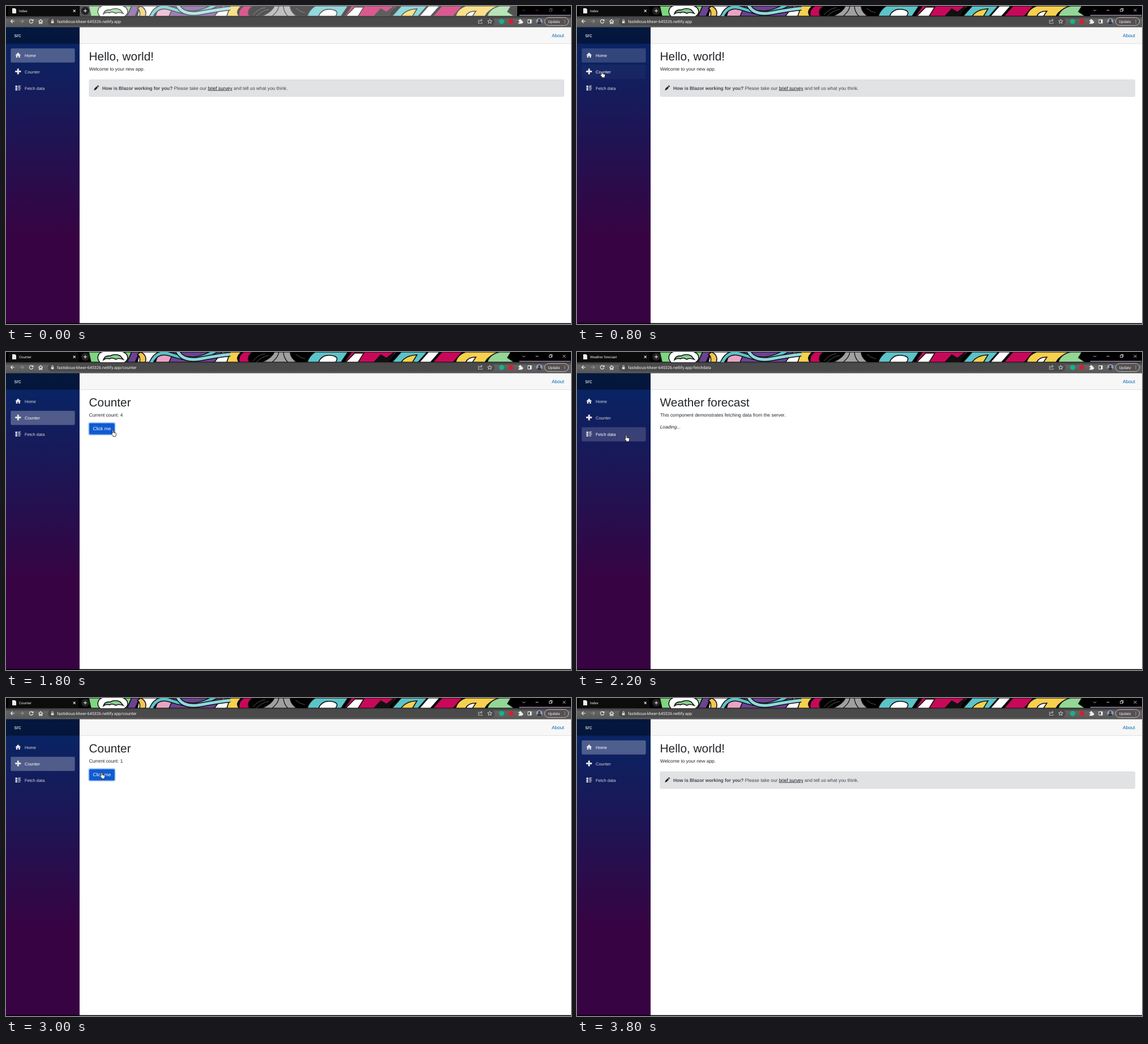
Recreate the animation shown at these times as an HTML page. Size 998 by 561 pixels, loop 4100 ms.

```html
<!DOCTYPE html>
<html lang="en">
<head>
<meta charset="utf-8">
<title>Web app demo</title>
<style>
  html, body { margin: 0; width: 100%; height: 100%; overflow: hidden; background: #fff }
  svg { display: block; font: 8.32px "Liberation Sans", Arial, sans-serif; text-rendering: geometricPrecision }
  .ui { font-family: Roboto, sans-serif; fill: #f1f1f1 }
  .line { fill: none; stroke: #eee; stroke-width: 1.1 }
  .nav { font-size: 7.49px; fill: #d7d7d7 }
  .on { fill: #fff }
  .h1 { font-size: 20.8px }
  .b { font-weight: bold }
  #page { fill: #212529 }
</style>
</head>
<body>
<svg width="998" height="561" viewBox="0 0 998 561">
  <defs>
    <linearGradient id="side" x2="0" y2="1">
      <stop stop-color="#052767"/><stop offset=".7" stop-color="#370342"/>
    </linearGradient>
    <linearGradient id="bar" x2="0" y2="1">
      <stop stop-color="#383838"/><stop offset=".3" stop-color="#646464"/><stop offset="1" stop-color="#565656"/>
    </linearGradient>
    <clipPath id="strip"><path d="M130 0H998V18H130z"/></clipPath>
  </defs>
  <rect width="998" height="561" fill="#fff"/>
  <rect width="998" height="18"/>
  <g id="art" clip-path="url(#strip)" stroke="#111" stroke-width="1.6"></g>
  <path id="haze" d="M130 0H903V18H130z" fill="#fff" opacity=".33"/>

  <!-- tab strip -->
  <path d="M0 18Q4 18 4 14V4Q4 0 8 0H124Q128 0 128 4V14Q128 18 132 18z" fill="#0c0c0d"/>
  <path d="M11 4h5l2 2v7h-7z" fill="#eee"/>
  <text id="tab" class="ui" x="23" y="11" font-size="6.2"></text>
  <path class="line" d="M118.700 6.700l4 4m0-4l-4 4"/>
  <circle cx="140" cy="8.500" r="7" fill="#222"/>
  <path class="line" d="M137 8.500h6m-3-3v6"/>
  <path d="M903 0h23v15h-23zM927 0h23v15h-23zM951 0h23v15h-23zM975 0h23v15h-23z"/>
  <path id="controls" class="line" style="stroke-width:.8" d="M912 6.500l2.500 2.500 2.500-2.500M935.500 7.500h5M959.500 5.700h4v4h-4zM961 5.500v-1h4v4h-1M983.500 5l5 5m0-5l-5 5"/>

  <!-- toolbar -->
  <rect y="18" width="998" height="20" fill="url(#bar)"/>
  <rect x="74" y="20.500" width="789" height="14" rx="7" fill="#4a4a4a"/>
  <path class="line" d="M15 27H8.500m3-3l-3 3 3 3M47.300 25.500a3.200 3.200 0 1 0 .3 2.500M48 23.500v2.500h-2.500M57.500 27.500l3.700-3.500 3.700 3.500M58.800 27v4h1.500v-2.500h1.800v2.500h1.500v-4"/>
  <path class="line" opacity=".35" d="M24.500 27H31m-3-3l3 3-3 3"/>
  <path class="line" opacity=".6" d="M836.500 25h-2v5.500h6.500v-2M836.500 28q.5-3 4-3m-1.500-2l2 2-2 2"/>
  <path d="M79.800 26.500h4.600v3.800h-4.600z" fill="#ddd"/>
  <path class="line" style="stroke-width:.8" d="M80.800 26.500v-1.500a1.300 1.300 0 0 1 2.600 0v1.500M854.500 23.300l1.100 2.600 2.800.2-2.100 1.800.7 2.700-2.500-1.500-2.500 1.500.7-2.700-2.100-1.800 2.800-.2z"/>
  <text id="url" class="ui" x="90" y="29.700" font-size="7.23"></text>
  <circle cx="875.500" cy="27.300" r="4.500" fill="#17b287"/>
  <circle cx="892" cy="27.300" r="4.300" fill="#d3202e"/>
  <path d="M905 25h2a1.400 1.400 0 1 1 2.600 0h2v2.100a1.400 1.400 0 1 1 0 2.600v1.500h-6.600v-2a1.300 1.300 0 1 0 0-2.400z" fill="#eee"/>
  <path d="M921.500 23.700h7v7h-7z" fill="#eee"/><path d="M922.700 25h2.500v4.500h-2.500z" fill="#333"/>
  <circle cx="942" cy="27" r="5.500" fill="#9aa0b2"/>
  <path d="M938 31q.3-4 4-4t4 4q-4 3-8 0z" fill="#363a4c"/><circle cx="942" cy="25" r="2.100" fill="#363a4c"/>
  <rect x="951.500" y="20.300" width="42" height="14" rx="7" fill="#555051" stroke="#d3cbcb" stroke-width=".9"/>
  <text class="ui" x="957.500" y="29.600" font-size="6.6">Update</text>
  <path d="M987 24v6.500" stroke="#e8a090" stroke-width="1.300" stroke-dasharray="1.300 1.300"/>

  <!-- app frame -->
  <rect y="37.500" width="130" height="523" fill="url(#side)"/>
  <rect y="37.500" width="130" height="29" opacity=".4"/>
  <text x="14.500" y="54.800" font-size="9.15" fill="#fff">src</text>
  <rect x="130" y="37.500" width="868" height="29" fill="#f7f7f7"/>
  <path d="M130 66.300H998" stroke="#d6d5d5" stroke-width=".7"/>
  <text x="964" y="54.500" fill="#0366b5">About</text>
  <path d="M0 560.300H998" stroke="#000" stroke-width="1.400"/>
  <g id="nav"></g>
  <g fill="#e6e6ea">
    <path d="M16.300 87l5-5 5 5h-1.500v4h-2.600v-3h-1.800v3h-2.600v-4z"/>
    <path d="M19.800 110.500h3v3.500h3.500v3h-3.500v3.500h-3v-3.500h-3.500v-3h3.500z"/>
    <path d="M16.500 140.500h3.500v2.500h-3.500zM16.500 143.800h3.500v2.500h-3.500zM16.500 147h3.500v2h-3.500zM21.300 140.500h5v1h-5zM21.300 142.300h3.500v1h-3.500zM21.300 144.300h5v1.200h-5zM21.300 147.300h4v1.200h-4z"/>
  </g>
  <g id="page"></g>
  <g id="cursor" stroke="#111" stroke-width=".8" fill="#fff" stroke-linejoin="round">
    <path id="hand" d="M-1 .2Q0-1 1 .2V4l4 1Q6 5.500 5.700 7L5 9.500V11H0V9.700L-3 6Q-3.300 4.700-2 5L-1 6z"/>
    <path id="arrow" d="M0 0V8.500L2 6.800 3.300 9.700 4.700 9 3.400 6.200H6z"/>
  </g>
</svg>
<script>
const $ = id => document.getElementById(id);
const LOOP = 4100, STEP = 100;

// Graffiti strip: [fill, path]; ribbons are outlined strokes.
const shapes = [
  ['#7fd67f', 'M146 0H222L214 18H150z'],
  ['#fff', 'M163 6Q166-3 188-3T214 6 206 20H168Q160 14 163 6z'],
  ['#86cf90', 'M172 14q2-8 12-7 10-5 18 0l5 6q-9-3-13 0-7-4-11-1-6-2-11 2z'],
  ['#6c4393', 'M214 18L222 0H236L228 18z'],
  ['#fff', 'M236 0H270L258 18H232z'],
  ['#f4c552', 'M238 0Q250 6 246 18H236Q238 8 232 4z'],
  ['#e9a3c4', 'M270 0H300L290 18H264z'],
  ['#6c4393', 'M296 0H392L384 18H288z'],
  ['#fff', 'M368 18L382 0H398L390 18z'],
  ['#f7d04e', 'M396 0H416Q404 10 412 18H390z'],
  ['#c9085a', 'M412 18Q410 6 420 0H436Q424 8 430 18z'],
  ['#a0a0a0', 'M452 18Q470 10 474 0H502Q502 10 514 18z'],
  ['#5cc3c9', 'M532 18Q536 6 546 0H604L592 18z'],
  ['#fff', 'M552 18Q558 4 574 6T582 18z'],
  ['#c9085a', 'M598 18L610 0H690L672 18z'],
  ['#fff', 'M600 18L616 2H632L622 18z'],
  ['#111', 'M650 18L662 5 672 11 686 0 676 18z'],
  ['#5cc3c9', 'M682 18L698 0H744L728 18z'],
  ['#f7d04e', 'M698 18Q706 6 726 5L718 18z'],
  ['#fff', 'M730 18L746 0H766L750 18z'],
  ['#c9085a', 'M754 18L770 0H806L790 18z'],
  ['#f7d04e', 'M794 18Q798 4 812 0H872Q852 6 846 18z'],
  ['#fff', 'M812 18Q816 9 830 9L824 18z'],
  ['#93d696', 'M850 18Q854 4 872 0H892L886 10 898 18z'],
  ['#a58fb8', 'M906 15H998V18H906z'],
];
const ribbons = [
  ['#5cc3c9', 'M256 20Q266-4 290 4T330 12 372-3'],
  ['#8fd8dc', 'M302-3Q312 18 344 12T396 4'],
];
$('art').innerHTML =
  shapes.map(([fill, d]) => `<path fill="${fill}" d="${d}"/>`).join('') +
  ribbons.map(([color, d]) =>
    `<path fill="none" stroke-width="8" d="${d}"/><path fill="none" stroke="${color}" stroke-width="5" d="${d}"/>`).join('') +
  '<path fill="none" stroke-width="1.300" d="M470 18Q482 8 482-1M490-1Q490 10 498 18"/>' +
  '<path fill="none" stroke="#777" stroke-width=".7" d="M436 16Q446 4 458 3M442 18Q452 8 464 6M512 4Q518 10 528 12"/>';

const text = (x, y, s, cls = '') => `<text x="${x}" y="${y}" class="${cls}">${s}</text>`;
const heading = (title, lead) => text(146.6, 95.6, title, 'h1') + text(146.7, 113.8, lead);
const rule = (y, color) => `<path d="M146.700 ${y}H985.500" stroke="${color}" stroke-width=".8"/>`;
const row = (cells, y, cls) => cells.map((s, i) => text([150.7, 359.3, 570.6, 777.8][i], y, s, cls)).join('');
const forecast = [
  ['5/6/2018', 1, 33, 'Freezing'], ['5/7/2018', 14, 57, 'Bracing'], ['5/8/2018', -13, 9, 'Freezing'],
  ['5/9/2018', -16, 4, 'Balmy'], ['5/10/2018', -2, 29, 'Chilly'],
];

const pages = [
  { tab: 'Index', path: '', draw: () => heading('Hello, world!', 'Welcome to your new app.') +
    `<rect x="147" y="130" width="838.500" height="29.700" rx="2" fill="#e0e2e4" stroke="#cfd2d5" stroke-width=".6"/>
     <path d="M155.300 148.700l.8-3 4-4 2.200 2.200-4 4zM160.800 141l1-1q.6-.3 1.100.2l1 1q.4.500 0 1l-1 1z"/>
     <text x="170" y="147.600" fill="#41464b"><tspan class="b">How is Blazor working for you?</tspan> Please take our <tspan fill="#1a1e21" text-decoration="underline">brief survey</tspan> and tell us what you think.</text>` },
  { tab: 'Counter', path: '/counter', draw: (count, hover) => heading('Counter', `Current count: ${count}`) +
    (count ? '<rect x="145.300" y="123.900" width="48.200" height="23.200" rx="3" fill="#86b7f5"/><rect x="146.200" y="124.800" width="46.400" height="21.400" rx="2.500" fill="#d5e6fd"/>' : '') +
    `<rect x="146.900" y="125.500" width="45" height="20" rx="2" fill="${hover ? '#0f5bd0' : '#1b6ec2'}"/>` +
    text(153.5, 138.3, 'Click me', 'on') },
  { tab: 'Weather forecast', path: '/fetchdata', draw: ready =>
    heading('Weather forecast', 'This component demonstrates fetching data from the server.') + (ready
      ? row(['Date', 'Temp. (C)', 'Temp. (F)', 'Summary'], 138.7, 'b') + rule(146.8, '#212529') +
        forecast.map((cells, i) => row(cells, 160 + i * 21.32, '') + rule(168 + i * 21.32, '#dee2e6')).join('')
      : '<text x="146.700" y="134.700" font-style="italic">Loading...</text>') },
];

// [start, page, argument for its draw function]
const scenes = [
  [0, 0], [900, 1, 0], [1200, 1, 1], [1400, 1, 2], [1600, 1, 3], [1800, 1, 4],
  [2200, 2, false], [2300, 2, true], [2800, 1, 0], [3000, 1, 1], [3100, 1, 2], [3200, 1, 3], [3400, 0],
];
// [time, x, y]
const track = [
  [300, -5, 140], [500, 60, 143], [700, 45, 118], [800, 44, 115.5], [900, 45, 117], [1000, 120, 130],
  [1100, 187, 138], [1200, 189, 138], [1800, 189, 138], [2000, 120, 147], [2100, 87, 147], [2300, 87, 147],
  [2600, 80, 131], [2700, 73.5, 116], [2800, 73.5, 116], [2900, 160, 130], [3000, 169, 131.5], [3200, 169, 131.5],
  [3300, 60, 100], [3400, 50, 88], [3500, 50, 88], [3600, 70, 180], [3700, 75, 312], [3800, 75, 570],
];

function pointer(t) {
  const i = track.findIndex(k => k[0] >= t);
  if (i < 1) return [-50, -50];
  const [t0, x0, y0] = track[i - 1], [t1, x1, y1] = track[i], p = (t - t0) / (t1 - t0);
  return [x0 + (x1 - x0) * p, y0 + (y1 - y0) * p];
}
const navY = [75, 104, 133];
const overNav = ([x, y]) => x > 8 && x < 121.5 ? navY.findIndex(top => y > top && y < top + 25) : -1;
const overButton = ([x, y]) => x > 147 && x < 192 && y > 125 && y < 146;

function render(t) {
  const [, index, arg] = scenes.findLast(s => s[0] <= t);
  const page = pages[index], pos = pointer(t), before = pointer(t - STEP);
  const hovered = overNav(pos);
  $('haze').style.display = t < 200 ? '' : 'none';
  $('controls').style.opacity = t < 200 ? .4 : 1;
  $('tab').textContent = page.tab;
  $('url').textContent = 'fastidious-kheer-645326.netlify.app' + page.path;

  const fading = t === 800 || t === 2200;
  const fill = i => i === index ? (fading ? .16 : .27) : i === hovered ? (fading ? .03 : .1) : 0;
  $('nav').innerHTML = ['Home', 'Counter', 'Fetch data'].map((name, i) =>
    `<rect x="8.300" y="${navY[i] - .2}" width="113.300" height="25" rx="2" fill="#fff" opacity="${fill(i)}"/>` +
    text(33, navY[i] + 14.8, name, fill(i) ? 'nav on' : 'nav')).join('');
  $('page').innerHTML = page.draw(arg, overButton(pos));

  const hand = overNav(before) >= 0 || index === 1 && overButton(before);
  $('cursor').setAttribute('transform', `translate(${pos})`);
  $('hand').style.display = hand ? '' : 'none';
  $('arrow').style.display = hand ? 'none' : '';
}

let shown = -1;
function tick() {
  const t = Math.floor(performance.now() % LOOP / STEP) * STEP;
  if (t !== shown) render(shown = t);
  requestAnimationFrame(tick);
}
tick();
</script>
</body>
</html>
```
